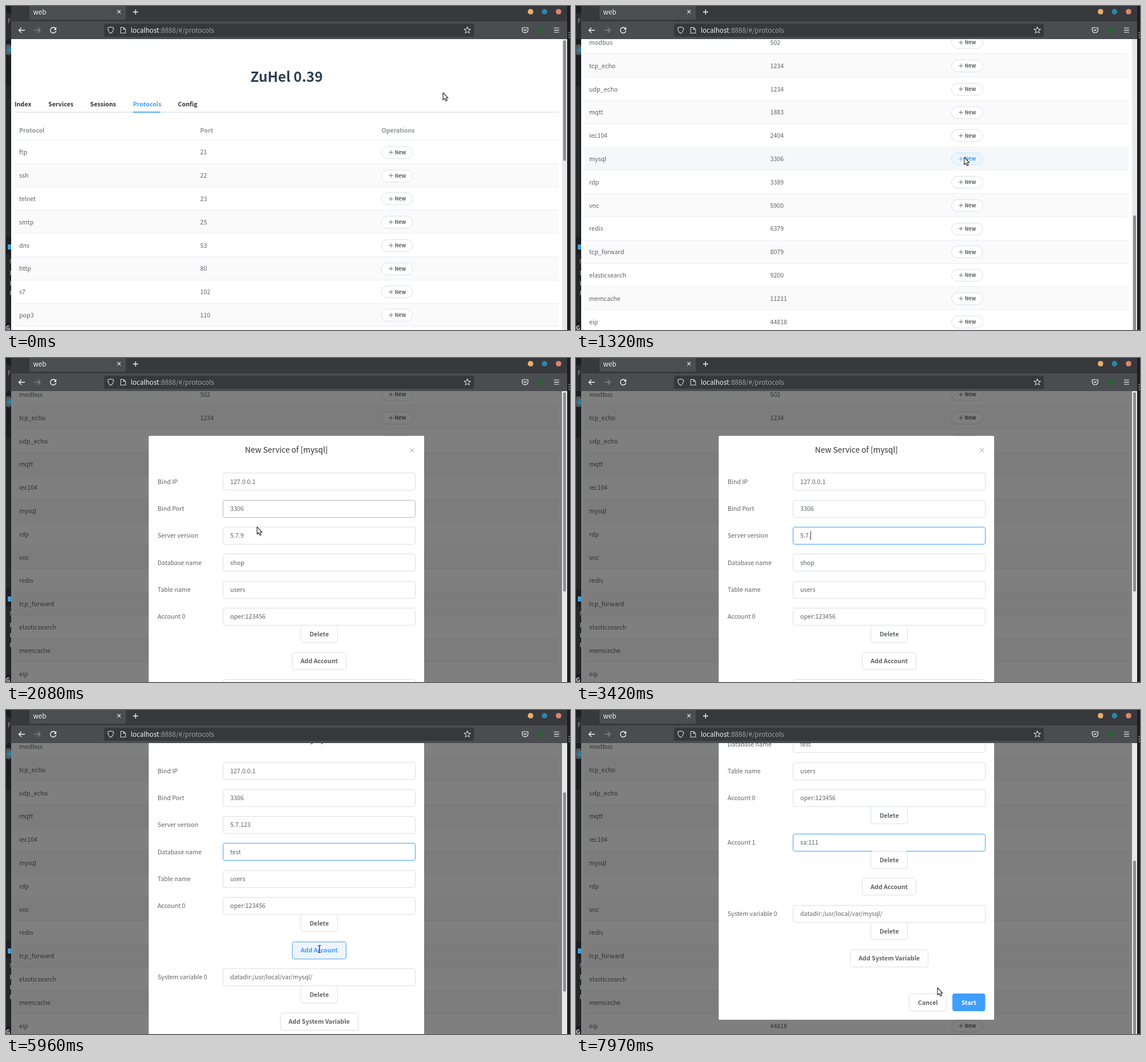
Recreate the animation shown at these times as an HTML page. Size 986 by 568 pixels, loop 8 s.

```html
<!DOCTYPE html>
<html lang="en">
<head>
<meta charset="utf-8">
<title>web</title>
<style>
html, body { margin: 0; width: 100%; height: 100%; overflow: hidden; background: #1c1e22; }
svg { display: block; width: 986px; height: 568px; }
text { font-family: "Noto Sans CJK SC", "Noto Sans CJK JP", "Noto Sans CJK", "Open Sans", sans-serif; white-space: pre; }
</style>
</head>
<body>
<svg viewBox="0 0 986 568" xmlns="http://www.w3.org/2000/svg">
  <defs><clipPath id="view"><rect x="9" y="58" width="972" height="510"/></clipPath></defs>
  <g id="chrome"></g>
  <g clip-path="url(#view)">
    <g id="page"></g>
    <rect id="shade" x="9" y="58" width="972" height="510"/>
    <g id="dialog"></g>
  </g>
  <g id="pointer"></g>
</svg>
<script>
const LOOP = 8000;
const OPEN = 1560, ADDED = 6020;
const BODY = 10.65, SMALL = 9.15;
const INK = '#606266', BLUE = '#409eff', EDGE = '#dcdfe6';
const $ = id => document.getElementById(id);

const protocols = ('ftp 21,ssh 22,telnet 23,smtp 25,dns 53,http 80,s7 102,pop3 110,dcerpc 135,imap 143,' +
  'snmp 161,smb 445,modbus 502,tcp_echo 1234,udp_echo 1234,mqtt 1883,iec104 2404,mysql 3306,rdp 3389,' +
  'vnc 5900,redis 6379,tcp_forward 8079,elasticsearch 9200,memcache 11211,eip 44818')
  .split(',').map(s => s.split(' '));

// Timelines: [time, value...]
const pageScroll = [[40, 0], [720, 412], [1180, 682]];
const dialogScroll = [[4190, 0], [4370, 53], [4560, 110], [7470, 110], [7930, 299]];
const pointerPath = [
  [0, 764, 152, 'arrow'], [40, 764, 152, 'arrow'], [600, 686, 268, 'arrow'], [720, 684, 272, 'arrow'],
  [1200, 680, 266, 'arrow'], [1580, 676, 264, 'beam'], [1700, 676, 264, 'beam'], [1880, 510, 270, 'beam'],
  [1980, 420, 273, 'beam'], [2060, 436, 292, 'arrow'], [2080, 439, 296, 'arrow'], [2200, 430, 310, 'beam'],
  [2520, 408, 313, 'beam'], [2720, 408, 313, 'beam'], [2930, 472, 311, 'beam'], [3420, 472, 311, 'none'],
  [4200, 468, 314, 'arrow'], [4370, 464, 330, 'arrow'], [4560, 446, 262, 'beam'], [4720, 420, 250, 'beam'],
  [5050, 420, 250, 'none'], [5520, 420, 252, 'beam'], [5840, 545, 412, 'beam'], [5940, 548, 419, 'beam'],
  [6080, 548, 420, 'beam'], [6360, 500, 422, 'beam'], [6940, 500, 422, 'none'],
  [7480, 520, 430, 'arrow'], [7900, 632, 487, 'arrow']];
const typed = {
  version: [[0, '5.7.9'], [3420, '5.7.'], [3500, '5.7.1'], [3600, '5.7.12'], [3700, '5.7.123']],
  database: [[0, 'shop'], [5050, 'sho'], [5090, 'sh'], [5130, 's'], [5170, ''],
    [5250, 't'], [5330, 'te'], [5410, 'tes'], [5490, 'test']],
  account: [[0, ''], [6940, 's'], [7000, 'sa'], [7100, 'sa:'], [7190, 'sa:1'], [7260, 'sa:11'], [7340, 'sa:111']]
};
const focusSpans = { version: [2700, 4800], database: [4800, 6020], account: [6400, LOOP] };
const caretSpans = [[2700, 3780], [4030, 4530], [4800, 5840], [6400, 7480]];

const clamp01 = v => Math.max(0, Math.min(1, v));
const last = (list, t) => list.reduce((a, k) => k[0] <= t ? k : a, list[0]);

function track(list, t, i = 1) {
  const a = last(list, t), b = list[list.indexOf(a) + 1];
  if (!b || t <= a[0]) return a[i];
  return a[i] + (b[i] - a[i]) * (t - a[0]) / (b[0] - a[0]);
}

// CSS "ease": cubic-bezier(.25, .1, .25, 1)
function ease(x) {
  x = clamp01(x);
  let lo = 0, hi = 1, s = x;
  for (let i = 0; i < 20; i++) {
    s = (lo + hi) / 2;
    const bx = .75 * s * (1 - s) * (1 - s) + .75 * s * s * (1 - s) + s * s * s;
    if (bx < x) lo = s; else hi = s;
  }
  return .3 * s * (1 - s) * (1 - s) + 3 * s * s * (1 - s) + s * s * s;
}

function mix(a, b, p) {
  const part = (c, i) => parseInt(c.substr(1 + 2 * i, 2), 16);
  return `rgb(${[0, 1, 2].map(i => Math.round(part(a, i) + (part(b, i) - part(a, i)) * p))})`;
}

const rect = (x, y, w, h, fill, more = '') =>
  `<rect x="${x}" y="${y}" width="${w}" height="${h}" fill="${fill}" ${more}/>`;
const path = (d, color, width = 1, more = '') =>
  `<path d="${d}" fill="none" stroke="${color}" stroke-width="${width}" ${more}/>`;
const circle = (x, y, r, fill) => `<circle cx="${x}" cy="${y}" r="${r}" fill="${fill}"/>`;
const text = (x, y, s, size, fill, bold, anchor = 'start') =>
  `<text x="${x}" y="${y}" font-size="${size}" fill="${fill}" font-weight="${bold ? 600 : 400}" text-anchor="${anchor}">${s}</text>`;
const cross = (x, y, r, color, w) => path(`M${x - r} ${y - r}l${2 * r} ${2 * r}m0 ${-2 * r}l${-2 * r} ${2 * r}`, color, w);
const plus = (x, y, r, color, w) => path(`M${x - r} ${y}h${2 * r}M${x} ${y - r}v${2 * r}`, color, w);

const ruler = document.createElement('canvas').getContext('2d');
function textWidth(s) {
  ruler.font = `${BODY * 10}px "Noto Sans CJK SC", "Noto Sans CJK JP", "Noto Sans CJK", "Open Sans", sans-serif`;
  return ruler.measureText(s).width / 10;
}

function drawChrome() {
  const lit = '#f4f4f6', soft = '#d6d6d9';
  let star = '';
  for (let i = 0; i < 10; i++) {
    const r = i % 2 ? 2.6 : 6, a = Math.PI * (i / 5 - .5);
    star += `${i ? 'L' : 'M'}${806.5 + r * Math.cos(a)} ${42.5 + r * Math.sin(a)}`;
  }
  $('chrome').innerHTML =
    rect(0, 0, 986, 568, '#1c1e22') + rect(0, 12, 9, 46, '#2a2c30') + rect(0, 140, 8, 265, '#25272b') +
    rect(0, 436, 8, 118, '#25272b') + text(3, 30, 'F', 10, '#9a9b9e') +
    rect(0, 67, 9, 19, '#54575c', 'rx="4"') + circle(7, 77, 5, '#2a7d9c') +
    rect(3, 418, 6, 9, '#3f9bdc') + text(6, 452, 'N', 10, '#9a9b9e') + text(0, 568, 'G', 10, '#e4e4e4', true) +
    [468, 486, 503].map(y => rect(7, y - 4, 2, 8, '#77797c')).join('') +
    [47, 51, 55].map(y => circle(984.5, y, 1, '#b5b6b8')).join('') +
    rect(9, 0, 972, 27, '#38393d') + rect(9, 27, 972, 31, '#4b4c50') +
    rect(41, -6, 168.5, 30, '#4c4d51', 'rx="3"') +
    text(47.5, 15.3, 'web', 11.6, lit) + cross(197.5, 10, 2.8, lit, 1.1) + plus(226.5, 10.5, 4.5, lit, 1.3) +
    circle(917, 10, 4.8, '#e9b062') + circle(941.5, 10, 4.8, '#2d87a3') + circle(966, 10, 4.8, '#db8768') +
    path('M33 42.5H22.5M27 38l-4.5 4.5L27 47', lit, 1.4) +
    path('M49.500 42.5H60M55.500 38l4.500 4.500L55.500 47', '#86878a', 1.3) +
    path('M86.500 39.300A5 5 0 1 0 87.500 43.500', lit, 1.4) + `<path d="M88 37v4.700h-4.700z" fill="${lit}"/>` +
    rect(171.5, 31, 646.5, 23, '#37383c', 'rx="3"') +
    path('M183 36.700l5 1.800c0 4.500-1.500 7.500-5 9.500c-3.500-2-5-5-5-9.500z', soft, 1.1) +
    path('M200.500 37.500h5l3.500 3.500v6.500h-8.500zM205.500 37.500v3.500h3.500', soft, 1.1) +
    `<text x="218" y="47" font-size="11.65" fill="${lit}">localhost<tspan fill="#a0a1a5">:8888/#/protocols</tspan></text>` +
    path(star + 'Z', soft, 1.1, 'stroke-linejoin="round"') +
    path('M902.500 38h10v4a5 5 0 0 1-10 0zM905 41l2.500 2.400L910 41', lit, 1.2, 'stroke-linejoin="round"') +
    rect(930, 37, 10, 10, '#2f6237') +
    path('M958 38.500h9M958 42.300h9M958 46h9', lit, 1.2);
}

function scrollbar(top, length) {
  return rect(972, 58, 9, 510, '#e9e9ea') + rect(974, top, 5, length, '#8d8d8f', 'rx="2.5"');
}

function newButton(cy, hot) {
  const color = hot ? BLUE : INK;
  return rect(656.5, Math.round(cy - 10.7) + .5, 54.5, 21, hot ? '#ecf5ff' : '#fff', `rx="10.5" stroke="${hot ? '#c6e2ff' : EDGE}"`) +
    plus(673, cy, 3.8, color, .9) + text(679.5, cy + 3.4, 'New', SMALL, color, true);
}

function drawPage(t) {
  const scroll = track(pageScroll, t);
  const top = i => 236 + 40.8 * i - scroll;
  // The hovered row trails behind the scrolling.
  const seen = Math.min(t, OPEN) - 100;
  const hovered = t > 1860 ? -1 : Math.floor((track(pointerPath, seen, 2) + track(pageScroll, seen) - 236) / 40.8);
  let s = rect(9, 58, 963, 510, '#fff');

  if (scroll < 250) {
    s += text(490.5, 132.500 - scroll, 'ZuHel 0.39', 24.3, '#2c3e50', true, 'middle');
    [['Index', 15], ['Services', 74], ['Sessions', 147], ['Protocols', 222], ['Config', 300.5]].forEach(([name, x]) =>
      s += text(x, 176.3 - scroll, name, BODY, name === 'Protocols' ? BLUE : '#303133', true));
    s += rect(15, 185.500 - scroll, 951, 1.5, '#e0e4ea') + rect(222, 185.3 - scroll, 48, 1.7, BLUE);
    [['Protocol', 23], ['Port', 339.5], ['Operations', 656.5]].forEach(([name, x]) =>
      s += text(x, 222 - scroll, name, BODY, '#909399', true));
    s += rect(15, Math.round(top(0)) - 1, 951, 1, '#ebeef5');
  }
  protocols.forEach(([name, port], i) => {
    const y = Math.round(top(i)), end = Math.round(top(i + 1)), cy = top(i) + 20.4;
    if (end < 58 || y > 568) return;
    const fill = i === hovered ? '#f5f7fa' : i % 2 ? '#fafafa' : '#fff';
    s += rect(15, y, 951, end - y, fill) + rect(15, end - 1, 951, 1, '#ebeef5') +
      text(23, cy + 4, name, BODY, INK) + text(339.5, cy + 4, port, BODY, INK) +
      newButton(cy, i === hovered && name === 'mysql');
  });
  $('page').innerHTML = s + (t < OPEN ? scrollbar(60 + .45 * scroll, 211.5) : rect(972, 58, 9, 510, '#fff'));
}

function drawDialog(t) {
  const shown = ease((t - OPEN) / 300);
  $('shade').setAttribute('opacity', t < OPEN ? 0 : .5 * ease((t - OPEN) / 200));
  $('dialog').setAttribute('opacity', t < OPEN ? 0 : shown);
  if (t < OPEN) { $('dialog').innerHTML = ''; return; }

  const scroll = track(dialogScroll, t), added = t >= ADDED, extra = added ? 77.8 : 0;
  const top = 136.6 - scroll;
  const caretOn = caretSpans.some(([a, b]) => t >= a && t < b);
  const seenX = track(pointerPath, t - 100, 1), seenY = track(pointerPath, t - 100, 2);
  let s = rect(249.5, top, 481.5, 627.700 + extra, '#fff', 'rx="1.7"') +
    text(490.3, top + 29.7, 'New Service of [mysql]', 13.7, '#303133', false, 'middle') +
    cross(709.5, top + 25.2, 3.5, '#909399', 1);

  function field(y, label, value, key) {
    const cy = top + y;
    const [from, to] = focusSpans[key] || [LOOP, LOOP];
    const focus = t < to ? clamp01((t - from) / 200) : 1 - clamp01((t - to) / 200);
    const hover = t > 1900 && seenX > 379 && seenX < 716 && Math.abs(seenY - cy) < 15.5;
    s += text(265, cy + 4, label, BODY, INK) +
      rect(379.5, Math.round(cy - 15.3) + .5, 336, 30, '#fff',
        `rx="3.2" stroke="${mix(hover ? '#b4b8c0' : EDGE, BLUE, focus)}"`) +
      text(392, cy + 4, value, BODY, INK);
    if (caretOn && t >= from && t < to) s += rect(392 + textWidth(value), cy - 8, 1, 16, '#303133');
  }
  function button(x, y, w, label, style = '') {
    const cy = top + y;
    const [fill, edge, ink] = { hot: ['#ecf5ff', '#509fee', BLUE], main: [BLUE, BLUE, '#fff'] }[style] || ['#fff', EDGE, INK];
    s += rect(x, Math.round(cy - 15.3) + .5, w, 30, fill, `rx="3.2" stroke="${edge}"`) +
      text(x + w / 2, cy + 4, label, BODY, ink, true, 'middle');
  }

  field(79.9, 'Bind IP', '127.0.0.1');
  field(127.3, 'Bind Port', '3306');
  field(174.6, 'Server version', last(typed.version, t)[1], 'version');
  field(222, 'Database name', last(typed.database, t)[1], 'database');
  field(269.4, 'Table name', 'users');
  field(316.7, 'Account 0', 'oper:123456');
  button(515.5, 347, 64, 'Delete');
  if (added) {
    field(394.5, 'Account 1', last(typed.account, t)[1], 'account');
    button(515.5, 425, 64, 'Delete');
  }
  button(500.5, 394.300 + extra, 94, 'Add Account', t >= 5880 && !added ? 'hot' : '');
  field(441.8 + extra, 'System variable 0', 'datadir:/usr/local/var/mysql/');
  button(515.5, 472.2 + extra, 64, 'Delete');
  button(479.5, 519.5 + extra, 136, 'Add System Variable');
  button(582.5, 597.3 + extra, 65.5, 'Cancel');
  button(658.5, 597.3 + extra, 56.5, 'Start', 'main');

  s += scrollbar(60 + (added ? .682 : .767) * scroll, added ? 311 : 349.5);
  $('dialog').innerHTML = s;
  $('dialog').setAttribute('transform', `translate(0 ${-17 * (1 - shown)})`);
}

function drawPointer(t) {
  const kind = last(pointerPath, t)[3];
  const shapes = {
    none: '',
    arrow: '<path d="M0 0V12.600L2.900 10L5 14.600L7.200 13.600L5.200 9.200H8.800Z" fill="#fff" stroke="#222" stroke-width="1.1" stroke-linejoin="round"/>',
    beam: path('M-2.500 -6h2l.5.500l.5-.500h2M0 -5.500V5.500M-2.500 6h2l.5-.500l.5.500h2', '#fff', 2.8, 'opacity=".6"') +
      path('M-2.500 -6h2l.5.500l.5-.500h2M0 -5.500V5.500M-2.500 6h2l.5-.500l.5.500h2', '#222', 1.3)
  };
  $('pointer').innerHTML = shapes[kind];
  $('pointer').setAttribute('transform', `translate(${track(pointerPath, t, 1)} ${track(pointerPath, t, 2)})`);
}

function draw(t) {
  drawPage(t);
  drawDialog(t);
  drawPointer(t);
}

const start = performance.now();
function tick() {
  draw((performance.now() - start) % LOOP);
  requestAnimationFrame(tick);
}
drawChrome();
tick();
</script>
</body>
</html>
```
